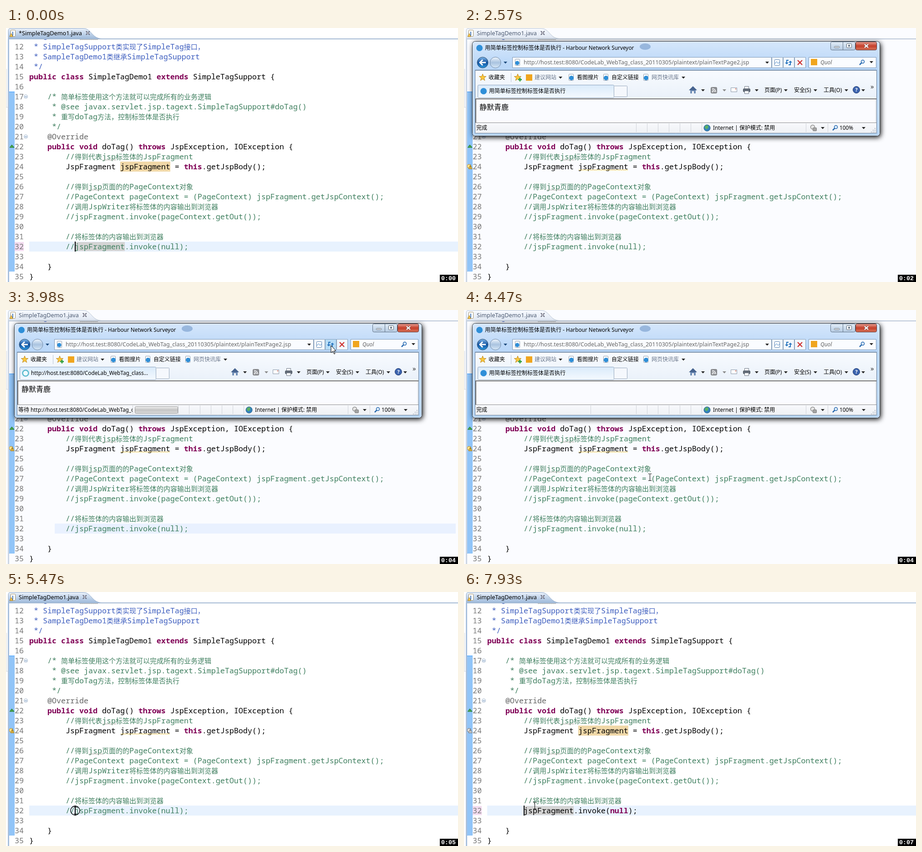
Animation of 993x559 px, one loop 8000 ms. Source, as an HTML page with a canvas:

```html
<!DOCTYPE html>
<html lang="zh-CN">
<head>
<meta charset="utf-8">
<style>
html, body { margin: 0; width: 100%; height: 100%; overflow: hidden; background: #fff; }
canvas { display: block; width: 993px; height: 559px; }
</style>
</head>
<body>
<canvas id="stage" width="993" height="559"></canvas>
<script>
const ctx = document.getElementById("stage").getContext("2d");
const LOOP = 8000;
const CJK = '"Noto Sans CJK SC", "Noto Sans CJK", sans-serif';
const MONO = '16.667px "Noto Sans Mono", monospace';
const sans = (size, style = "") => ({ latin: `${style} ${size}px "Noto Sans", sans-serif`, cjk: "12px " + CJK });
const code = { latin: MONO, cjk: "15px " + CJK };
const keyword = { latin: "bold " + MONO, cjk: "15px " + CJK };
const ui = sans(11.8), tabFont = sans(12.7), addressFont = sans(12.5);
const uiItalic = sans(12, "italic"), uiBold = sans(11, "bold");
const pageFont = { cjk: "300 16px " + CJK };

const BLACK = "#000", GREEN = "#3f7f5f", DOC = "#3f5fbf", PURPLE = "#7f0055";
const TITLE = "用简单标签控制标签体是否执行";
const URL_HOST = "http://host.test:8080/";
const URL_TEXT = URL_HOST + "CodeLab_WebTag_class_20110305/plaintext/plainTextPage2.jsp";

// Backticks toggle the keyword style.
const LINES = [
  [12, 1, DOC, "* SimpleTagSupport类实现了SimpleTag接口，"],
  [13, 1, DOC, "* SampleTagDemo1类继承SimpleTagSupport"],
  [14, 1, DOC, "*/"],
  [15, 0, BLACK, "`public class` SimpleTagDemo1 `extends` SimpleTagSupport {"],
  [17, 4, GREEN, "/* 简单标签使用这个方法就可以完成所有的业务逻辑"],
  [18, 5, GREEN, "* @see javax.servlet.jsp.tagext.SimpleTagSupport#doTag()"],
  [19, 5, GREEN, "* 重写doTag方法，控制标签体是否执行"],
  [20, 5, GREEN, "*/"],
  [21, 4, "#646464", "@Override"],
  [22, 4, BLACK, "`public void` doTag() `throws` JspException, IOException {"],
  [23, 8, GREEN, "//得到代表jsp标签体的JspFragment"],
  [24, 8, BLACK, "JspFragment jspFragment = `this`.getJspBody();"],
  [26, 8, GREEN, "//得到jsp页面的的PageContext对象"],
  [27, 8, GREEN, "//PageContext pageContext = (PageContext) jspFragment.getJspContext();"],
  [28, 8, GREEN, "//调用JspWriter将标签体的内容输出到浏览器"],
  [29, 8, GREEN, "//jspFragment.invoke(pageContext.getOut());"],
  [31, 8, GREEN, "//将标签体的内容输出到浏览器"],
  [34, 4, BLACK, "}"],
  [35, 0, BLACK, "}"]
];

const OPEN = 2570, CLOSE = 5470, RELOAD = 3740, LOADED = 4200;
const TICKS = [1000, 1900, 2990, 3960, 4990, 6020, 7010];
const CARET_OFF = [[690, 1150], [1600, 2170], [6020, 6580], [7230, 7760]];
const MOUSE_PATHS = [
  [[1350, 562, 480], [1600, 553, 538], [1750, 550, 552], [1900, 550, 552]],
  [[2710, 550, 545], [2990, 590, 380], [3450, 714, 79], [4200, 714, 79], [4320, 716, 105],
   [4470, 409, 368], [4860, 190, 465], [5200, 152, 481], [6580, 152, 481]],
  [[7100, 152, 481], [7600, 155, 470], [8000, 155, 470]]
];

const within = (t, a, b) => t >= a && t < b;
const rowY = n => 41 + 22 * (n - 12);

function rect(x, y, w, h, color) {
  ctx.fillStyle = color;
  ctx.fillRect(x, y, w, h);
}

function box(x, y, w, h, r, fill, stroke) {
  ctx.beginPath();
  ctx.roundRect(x + .5, y + .5, w - 1, h - 1, r);
  if (fill) { ctx.fillStyle = fill; ctx.fill(); }
  if (stroke) { ctx.lineWidth = 1; ctx.strokeStyle = stroke; ctx.stroke(); }
}

function circle(x, y, r, fill, stroke, width = 1) {
  ctx.beginPath();
  ctx.arc(x, y, r, 0, 7);
  if (fill) { ctx.fillStyle = fill; ctx.fill(); }
  if (stroke) { ctx.lineWidth = width; ctx.strokeStyle = stroke; ctx.stroke(); }
}

function shape(points, fill, stroke, width = 1) {
  ctx.beginPath();
  points.forEach(([x, y]) => ctx.lineTo(x, y));
  if (fill) { ctx.closePath(); ctx.fillStyle = fill; ctx.fill(); }
  if (stroke) { ctx.lineWidth = width; ctx.strokeStyle = stroke; ctx.stroke(); }
}

function cross(x, y, rx, ry, color, width) {
  shape([[x - rx, y - ry], [x + rx, y + ry]], null, color, width);
  shape([[x + rx, y - ry], [x - rx, y + ry]], null, color, width);
}

function gradient(y0, y1, ...colors) {
  const g = ctx.createLinearGradient(0, y0, 0, y1);
  colors.forEach((c, i) => g.addColorStop(i / (colors.length - 1), c));
  return g;
}

function clipped(x, y, w, h, draw) {
  ctx.save();
  ctx.beginPath();
  ctx.rect(x, y, w, h);
  ctx.clip();
  draw();
  ctx.restore();
}

function write(text, x, base, color, style = ui) {
  ctx.fillStyle = color;
  for (const run of text.match(/[\u3000-\uffef]+|[^\u3000-\uffef]+/g) || []) {
    ctx.font = run.charCodeAt(0) >= 0x3000 ? style.cjk : style.latin;
    ctx.fillText(run, x, base);
    x += ctx.measureText(run).width;
  }
  return x;
}

function writeCode(n, col, color, text) {
  let x = 51 + col * 10;
  text.split("`").forEach((part, i) => {
    x = write(part, x, rowY(n) + 6, i % 2 ? PURPLE : color, i % 2 ? keyword : code);
  });
}

function squiggle(x0, x1, y, color = "#a5a098") {
  const points = [];
  for (let x = x0; x <= x1; x += 2) points.push([x, y + (x - x0) % 4 / 2]);
  shape(points, null, color);
}

const hatch = (() => {
  const tile = document.createElement("canvas");
  tile.width = tile.height = 2;
  const c = tile.getContext("2d");
  c.fillStyle = "#f0f0f0";
  c.fillRect(0, 0, 2, 2);
  c.fillStyle = "#3399ff";
  c.fillRect(0, 0, 1, 1);
  c.fillRect(1, 1, 1, 1);
  return ctx.createPattern(tile, "repeat");
})();

function editorTab(active, dirty) {
  ctx.beginPath();
  ctx.moveTo(5, 24);
  ctx.lineTo(5, 6);
  ctx.quadraticCurveTo(5, .5, 11, .5);
  ctx.lineTo(168, .5);
  ctx.bezierCurveTo(188, .5, 188, 23, 210, 23.5);
  ctx.fillStyle = active ? gradient(0, 24, "#eaf1fb", "#9db9da") : gradient(0, 24, "#f8faff", "#dfe7f2");
  ctx.fill();
  ctx.strokeStyle = active ? "#93abc9" : "#b6c2d2";
  ctx.lineWidth = 1;
  ctx.stroke();
  rect(5, 23, 988, 2, active ? "#a3b9d4" : "#bcc8d8");
  rect(4, 24, 3, 535, active ? "#a9c0dd" : "#ccd6e4");
  rect(1, 90, 1, 84, "#d5d9df");
  rect(0, 174, 4, 1, "#d5d9df");

  box(10, 4, 11, 15, 1, "#fff", "#a5936a");
  write("J", 13, 16, "#2b62a8", uiBold);
  shape([[8, 19], [11.5, 12], [15, 19]], "#f5c84c", "#a87b20");
  const end = write((dirty ? "*" : "") + "SimpleTagDemo1.java", 28, 16, active ? BLACK : "#4d5b72", tabFont);
  cross(end + 13, 11, 4, 4, "#667", 2);
  circle(end + 13, 11, 1.2, "#fff");
}

function marker(resolved) {
  circle(11, 304, 4, resolved ? "#ddd" : "#fbe58f", resolved ? "#777" : "#b78b2c");
  shape([[10, 310], [14, 301], [18, 310]], resolved ? "#eee" : "#f7c93f", resolved ? "#666" : "#a8781d");
  rect(13.5, 304, 1, 3, "#333");
  rect(13.5, 308, 1, 1, "#333");
}

function editor(t, browserOpen) {
  const active = !browserOpen;
  const marked = t < 300 || t >= 7130;
  const changed = t < 820 || t >= 6580;
  const removed = t < 6580 ? 0 : t < 6700 ? 1 : 2;
  const caretX = 151 - removed * 10;

  rect(0, 0, 993, 559, active ? "#fff" : "#fbfcff");
  if (active) rect(51, 470, 942, 22, "#e8f2fe");
  else if (within(t, 2990, 4320)) rect(107, 470, 881, 22, "#e9f1ff");
  rect(7, 140, 12, 396, hatch);
  rect(5, 140, 14, 1, "#3399ff");
  if (changed) rect(19, 471, 20, 20, "#f3dcf0");
  if (marked) {
    rect(251, 294, 110, 22, "#f0d8a8");
    rect(caretX, 471, 110, 20, "#d4d4d4");
  }

  clipped(50, 24, 400, 8, () => {
    writeCode(11, 1, DOC, "* @");
    squiggle(162, 202, 25);
  });
  for (let n = 12; n <= 35; n++) write(String(n), 19, rowY(n) + 6, "#787878", code);
  LINES.forEach(line => writeCode(...line));
  if (removed === 2) writeCode(32, 8, BLACK, "jspFragment.invoke(`null`);");
  else writeCode(32, 8, removed ? BLACK : GREEN, "//".slice(removed) + "jspFragment.invoke(null);");

  squiggle(212, 242, 290);
  squiggle(182, 212, 356);
  if (!marked) squiggle(252, 361, 312, "#ecc03c");
  for (const n of [17, 21]) {
    circle(43.5, rowY(n), 4, "#f2f6fb", "#a5b6cb");
    rect(41, rowY(n), 5, 1, "#557fae");
  }
  shape([[8, 263], [13, 257], [18, 263]], "#47a447", "#277a30");
  if (t >= 150) marker(t >= 7130);
  editorTab(active, t < 690 || within(t, 6580, 7930));

  if (active && !CARET_OFF.some(([a, b]) => within(t, a, b))) rect(caretX, 470, 2, 22, BLACK);
}

const drop = (x, y, color = "#222") => shape([[x - 4, y - 2], [x + 4, y - 2], [x, y + 2.5]], color);
const logo = (x, y, r = 6) => circle(x, y, r, "#2f8fd8");

function star(x, y) {
  const points = Array.from({ length: 10 }, (_, i) => {
    const a = i * Math.PI / 5 - Math.PI / 2, r = i % 2 ? 3.3 : 8;
    return [x + r * Math.cos(a), y + r * Math.sin(a)];
  });
  shape(points, "#fbc83a", "#c28a1e");
}

function lens(x, y) {
  shape([[x - 5, y + 5], [x, y]], null, "#2768ae", 2.5);
  circle(x + 2, y - 2, 3.5, "#e5f3ff", "#2768ae", 1.5);
}

function windowFrame() {
  ctx.save();
  ctx.shadowColor = "#000";
  ctx.shadowBlur = 12;
  ctx.shadowOffsetX = 2;
  ctx.shadowOffsetY = 3;
  box(18, 29, 896, 209, 6, "#b4d3f5");
  ctx.restore();
  box(18, 29, 896, 209, 6, gradient(29, 238, "#d6e7fb", "#bad7f8", "#b9d7f8", "#c0dbf8", "#b4d3f5"), "#2c3947");
  box(19, 30, 894, 207, 5, null, "rgba(255,255,255,.7)");
  ctx.fillStyle = "rgba(105,145,196,.55)";
  ctx.beginPath();
  ctx.ellipse(398, 41, 12, 7, 0, 0, 7);
  ctx.fill();

  logo(34, 44, 7);
  write(TITLE + " - Harbour Network Surveyor", 46, 48, BLACK);
  box(805, 30, 55, 19, 3, gradient(30, 49, "#e3edf7", "#b4cae2"), "#5d6f83");
  rect(832, 31, 1, 17, "#64768a");
  box(860, 30, 47, 19, 3, gradient(30, 49, "#e8a498", "#c6402b", "#d8765c"), "#5d2a26");
  box(813, 40, 12, 4, 1, "#fff", "#53606e");
  box(840, 34, 12, 10, 1, "#fff", "#53606e");
  box(844, 37, 4, 4, 0, "#8ca0b5", "#53606e");
  cross(884, 39.5, 4, 3.5, "#6a3733", 4);
  cross(884, 39.5, 4, 3.5, "#fff", 2.4);
}

function navigation(pressed) {
  circle(41, 76, 12, gradient(64, 88, "#7fb7ea", "#12519f", "#2e9ae0"), "#31506f");
  shape([[48, 76], [36, 76]], null, "#fff", 3);
  shape([[41, 70], [35, 76], [41, 82]], null, "#fff", 3);
  circle(69, 76, 12, gradient(64, 88, "#f0f6fd", "#a9c3e0", "#d8e8f7"), "#708aa8");
  drop(91, 76, "#1c4a7c");

  box(106, 64, 570, 24, 0, "#fafcff", "#7e98b5");
  box(112, 68, 11, 15, 1, "#fff", "#8a97a8");
  logo(117, 77, 4.5);
  write(URL_TEXT, 131, 80, "#666", addressFont);
  drop(666, 76);
  [676, 701, 726].forEach((x, i) =>
    box(x, 64, 25, 24, 0, pressed && i === 1 ? "#b7dcf6" : "#f2f7fd", "#8ba3bd"));
  box(682, 69, 12, 14, 1, "#fff", "#5b82b0");
  shape([[683, 78], [687, 74], [690, 78], [693, 75]], null, "#4285c7");
  const blue = "#2875be";
  shape([[713, 71], [709, 71], [709, 77]], null, blue, 2);
  shape([[705, 76], [713, 76], [709, 80]], blue);
  shape([[713, 81], [717, 81], [717, 75]], null, blue, 2);
  shape([[713, 76], [721, 76], [717, 72]], blue);
  cross(738, 76, 5, 5, "#cf3434", 2.4);

  box(757, 64, 149, 24, 0, "#fafcff", "#7e98b5");
  rect(762, 68, 14, 14, "#f0a51e");
  write("Quol", 783, 80, "#666", uiItalic);
  lens(874, 76);
  drop(895, 75);
}

function toolbars(loading) {
  rect(25, 93, 881, 62, gradient(93, 155, "#f8fbff", "#f1f6fc", "#eaf1fa"));
  rect(25, 93, 881, 1, "#8fa6bf");
  star(41, 109);
  write("收藏夹", 54, 113, BLACK);
  rect(103, 99, 1, 20, "#b9c4d2");
  star(118, 109);
  rect(119, 112, 8, 3, "#3aa348");
  rect(121.5, 109.5, 3, 8, "#3aa348");
  rect(136, 102, 14, 14, "#f0a51e");
  write("建议网站", 155, 113, "#68758a");
  drop(212, 109);
  [[236, "看图搜片", BLACK], [312, "自定义链接", BLACK], [400, "网页快讯库", "#68758a"]].forEach(([x, text, color]) => {
    box(x - 6, 101, 11, 15, 1, "#fff", "#8a97a8");
    logo(x, 110, 5);
    write(text, x + 12, 113, color);
  });
  drop(482, 109);

  box(30, 125, 300, 29, 2, gradient(125, 154, "#d9eafa", "#f5faff"), "#8fa5bd");
  box(329, 127, 30, 25, 1, "#f5f8fd", "#98a9bc");
  if (loading) {
    circle(43, 139, 6.5, "#eefaff", "#57b9cd", 2.5);
    write(URL_HOST + "CodeLab_WebTag_class...", 55, 143, BLACK);
  } else {
    logo(43, 139, 7);
    write(TITLE, 55, 143, BLACK);
  }

  rect(497, 136, 12, 8, "#7290b8");
  shape([[494, 137], [503, 128], [512, 137]], "#46638f");
  rect(501, 139, 4, 5, "#f7f7f7");
  box(542, 130, 14, 14, 2, "#8c8f94", "#777");
  circle(546, 140, 1.5, "#fff");
  for (const r of [5, 8]) {
    ctx.beginPath();
    ctx.arc(545, 141, r, -Math.PI / 2, 0);
    ctx.strokeStyle = "#fff";
    ctx.lineWidth = 1.5;
    ctx.stroke();
  }
  box(586, 131, 14, 10, 0, "#fff", "#8996a7");
  rect(596, 133, 2, 2, "#d56b55");
  box(613, 133, 16, 8, 2, "#626b77", "#49515d");
  box(616, 128, 10, 6, 0, "#fff", "#6f7885");
  box(616, 138, 10, 7, 0, "#fff", "#6f7885");
  write("页面(P)", 660, 141, BLACK);
  write("安全(S)", 725, 141, BLACK);
  write("工具(O)", 790, 141, BLACK);
  circle(862, 136, 7.5, "#3b63ae", "#273f72");
  write("?", 859.5, 140, "#fff", uiBold);
  for (const x of [525, 643, 707, 772, 840, 877]) drop(x, 137);
  drop(572, 137, "#888");
  write("»", 893, 134, "#333", sans(15));
}

function pageAndStatus(loading, blank, progress) {
  rect(25, 154, 881, 54, "#fafbff");
  rect(25, 155, 881, 2, "#747474");
  rect(25, 155, 2, 53, "#777");
  rect(904, 157, 1, 51, "#d5d9df");
  if (!blank) write("静默青鹿", 34, 180, BLACK, pageFont);

  rect(25, 208, 881, 23, gradient(208, 231, "#f8f9fc", "#eff1f5"));
  rect(25, 208, 881, 1, "#8c8c8c");
  clipped(25, 209, 253, 22, () =>
    write(loading ? "等待 " + URL_HOST + "CodeLab_WebTag_class" : "完成", 27, 224, BLACK));
  for (let x = 378; x <= 522; x += 24) rect(x, 210, 1, 19, "#cfd2d8");
  for (const x of [751, 799]) rect(x, 210, 1, 19, "#cfd2d8");
  if (loading || blank) rect(278, 210, 1, 19, "#cfd2d8");
  if (progress) box(283, 212, 95, 16, 2, gradient(212, 228, "#f3f3f3", "#c4c4c4", "#dedede"), "#999");

  circle(534, 220, 7, "#3482bd", "#26608a");
  shape([[530, 215], [536, 214], [537, 219], [533, 223], [529, 220]], "#5db264");
  write("Internet | 保护模式: 禁用", 547, 224, BLACK);
  circle(766, 218, 4.5, "#e7e7e7", "#8d8d8d", 1.5);
  box(766, 219, 9, 8, 1, "#a4a4a4", "#7e7e7e");
  lens(815, 220);
  write("100%", 825, 224, BLACK);
  drop(788, 220);
  drop(878, 220);
  for (let i = 0; i < 3; i++)
    for (let j = 0; j <= i; j++) rect(902 - j * 4, 220 + i * 4, 2, 2, "#b4bbc6");
  box(24, 92, 883, 140, 0, null, "#6d8196");
}

function browser(t) {
  const loading = within(t, RELOAD, LOADED);
  windowFrame();
  navigation(within(t, 3450, 4250));
  toolbars(loading);
  pageAndStatus(loading, t >= LOADED, within(t, RELOAD, 4470));
}

function pointer(t, browserOpen) {
  const path = MOUSE_PATHS.find(p => within(t, p[0][0], p.at(-1)[0]));
  if (!path) return;
  const i = path.findIndex(p => p[0] > t);
  const [t0, x0, y0] = path[i - 1], [t1, x1, y1] = path[i];
  const k = (t - t0) / (t1 - t0);
  const x = Math.round(x0 + (x1 - x0) * k), y = Math.round(y0 + (y1 - y0) * k);

  if (within(t, CLOSE, 5620)) circle(152, 481, 10, null, BLACK, 1.3);
  if (browserOpen && y < 240) {
    shape([[x, y - 1], [x, y + 15], [x + 4, y + 12], [x + 7, y + 18],
      [x + 9, y + 17], [x + 6, y + 11], [x + 11, y + 11], [x, y - 1]], "#fff", BLACK);
  } else {
    rect(x, y - 7, 1, 15, BLACK);
    for (const dy of [-8, 7]) {
      rect(x - 3, y + dy, 3, 1, BLACK);
      rect(x + 1, y + dy, 3, 1, BLACK);
    }
  }
}

function clock(t) {
  rect(953, 543, 40, 16, BLACK);
  const seconds = TICKS.filter(tick => t >= tick).length;
  write("0:0" + seconds, 956, 555, "#fff", { latin: 'bold 13.333px "Liberation Mono", monospace' });
}

function render() {
  const t = performance.now() % LOOP;
  const browserOpen = within(t, OPEN, CLOSE);
  editor(t, browserOpen);
  if (browserOpen) browser(t);
  pointer(t, browserOpen);
  clock(t);
  requestAnimationFrame(render);
}
render();
</script>
</body>
</html>
```
